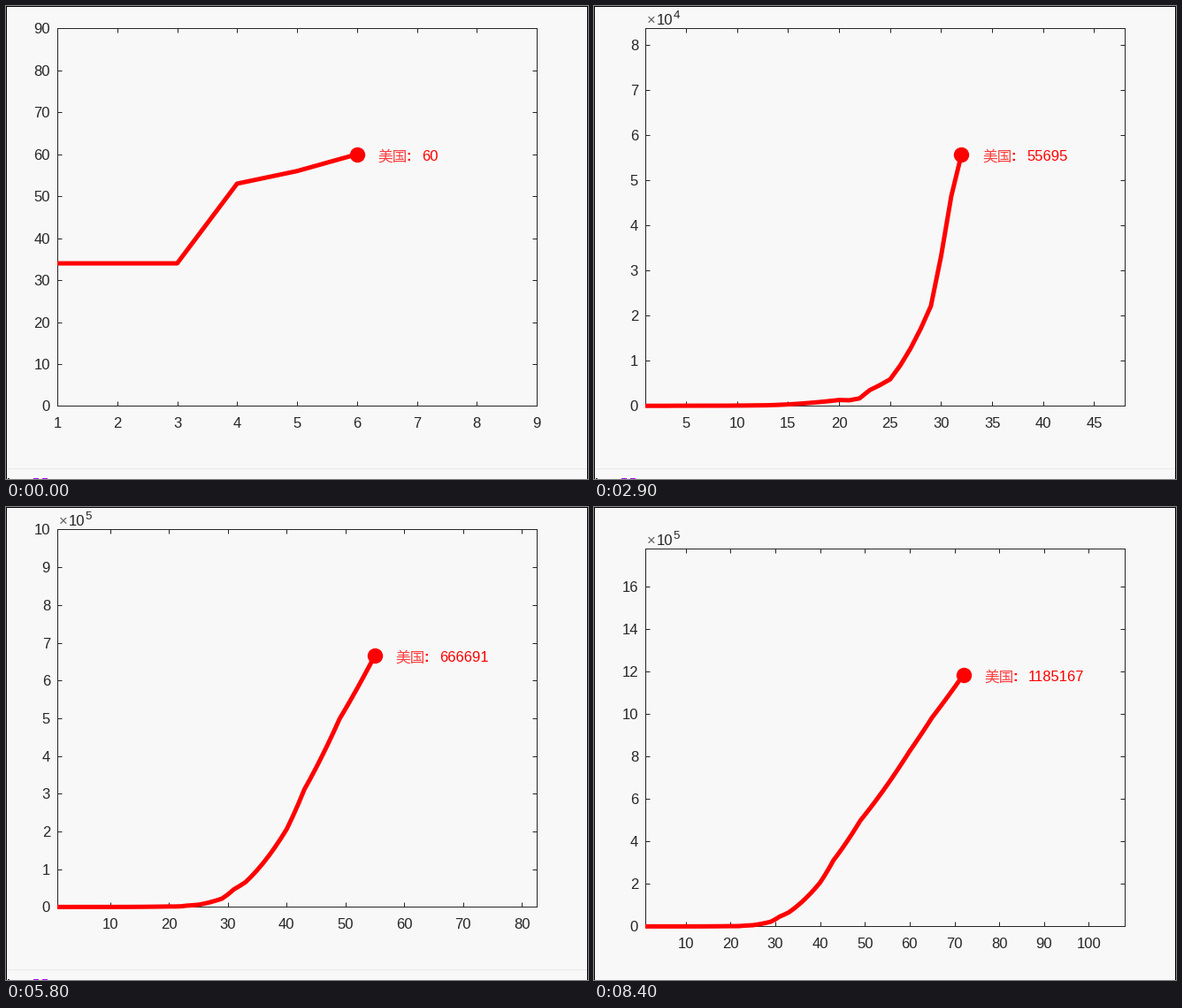
Animation, 658 px wide and 535 px high, one loop 8.5 s. Source, as a matplotlib script:

```python
import math

import numpy as np
import matplotlib.pyplot as plt
from matplotlib.animation import FuncAnimation
from matplotlib.patches import Rectangle

W, H, DPI = 658, 535, 100
PX = 72 / DPI
INK, RED, PAPER = "#262626", "#ff0000", "#f8f8f8"
SIZE = 12
FRAMES, FIRST_DAY, LAST_DAY = 85, 6, 72

# Turning points of the curve; between them the square root grows evenly
KEYS = {1: 34, 3: 34, 4: 53, 6: 60, 9: 69, 13: 161, 15: 345,
        20: 1322, 21: 1264, 22: 1678, 23: 3503, 25: 5894,
        29: 22132, 31: 46450, 33: 65778, 40: 206207, 43: 311357,
        49: 498674, 60: 825306, 65: 983457, 72: 1185167}
days = np.arange(1, LAST_DAY + 1)
cases = np.rint(np.interp(days, list(KEYS), np.sqrt(list(KEYS.values()))) ** 2)
cases = cases.astype(int)

# Each new day takes a little longer to arrive than the one before
step = np.arange(LAST_DAY - FIRST_DAY + 1)
arrival = step + np.floor(0.55 + step ** 2 / 273)

plt.rcParams["font.family"] = "Liberation Sans"
fig = plt.figure(figsize=(W / DPI, H / DPI), dpi=DPI, facecolor=PAPER)

stage = fig.add_axes([0, 0, 1, 1])
stage.set(xlim=(0, W), ylim=(H, 0))
stage.axis("off")


def block(x, y, w, h, color):
    return stage.add_patch(Rectangle((x, y), w, h, fc=color, lw=0))


block(0, 0, W, 1, "black")
block(0, 0, 1, H, "black")
block(W - 1, 0, 1, H, "black")
footer = [
    block(2, 533.6, 2, 1.4, "#333333"),
    block(31, 533.5, 6, 1.5, "#a800f0"),
    block(41, 533.5, 6, 1.5, "#a800f0"),
    stage.plot([1, W - 1], [522.5, 522.5], color="#dedede",
               lw=PX, ls=(0, (1, 1)))[0],
]

ax = fig.add_axes([0, 0, 1, 1], facecolor="none")
for spine in ax.spines.values():
    spine.set(linewidth=PX, color=INK)
ax.tick_params(direction="in", top=True, right=True, length=5 * PX,
               width=PX, color=INK, labelcolor=INK, labelsize=SIZE)
ax.tick_params(axis="x", pad=13 * PX)
ax.tick_params(axis="y", pad=8 * PX)

curve, = ax.plot([], [], color=RED, lw=5 * PX, zorder=3, clip_on=False,
                 solid_capstyle="butt", solid_joinstyle="round")
dot, = ax.plot([], [], "o", color=RED, ms=17.4 * PX, mew=0,
               zorder=4, clip_on=False)


def note(text, dx, dy, coords="data", **style):
    """Text whose baseline starts dx, dy pixels from its anchor."""
    style = {"fontsize": SIZE, "color": RED, **style}
    return ax.annotate(text, (0, 1), xytext=(dx * PX, dy * PX),
                       xycoords=coords, textcoords="offset points",
                       va="baseline", ha="left", annotation_clip=False,
                       **style)


label = [
    note("美国", 23.5, -8, family="Noto Sans CJK JP", alpha=0.75),
    note(":", 55.5, -7, weight="bold"),
    note("", 73.5, -7),
]
scale = [
    note("×", 1.5, 4.5, "axes fraction", color="#606060"),
    note("10", 12.5, 4.5, "axes fraction", color=INK),
    note("", 31.5, 11.5, "axes fraction", color=INK, fontsize=9.6),
]


def nice_step(span, most):
    """Smallest 1-2-5 step that cuts the span into at most `most` parts."""
    mag = 10 ** math.floor(math.log10(span))
    return next(s * mag for s in (0.1, 0.2, 0.5, 1) if span / (s * mag) <= most)


def y_step(top):
    mag = 10 ** math.floor(math.log10(top))
    # A range that barely passes 15 reads best in fives
    return mag / 2 if 1.5 <= top / mag < 1.52 else nice_step(top, 11)


def ticks(low, high, gap):
    return np.arange(math.ceil(low / gap), math.floor(high / gap + 1e-9) + 1) * gap


def update(i):
    last = i == FRAMES - 1
    day = FIRST_DAY + np.searchsorted(arrival, i, side="right") - 1
    value = cases[day - 1]
    right, top = 1.5 * day, 1.5 * value

    # The window slides down on the closing frame
    bottom = 452.4 + (22 if last else 0)
    ax.set_position([58 / W, 1 - bottom / H, 542 / W, 427 / H])
    for part in footer:
        part.set_visible(not last)

    power = math.floor(math.log10(top / 2))
    scaled = power >= 4
    unit = 10 ** power if scaled else 1
    xs = ticks(1, right, nice_step(right - 1, 12))
    ys = ticks(0, top, y_step(top))
    ax.set_xticks(xs, [f"{x:g}" for x in xs])
    ax.set_yticks(ys, [f"{y / unit:g}" for y in ys])
    ax.set(xlim=(1, right), ylim=(0, top))

    for part in scale:
        part.set_visible(scaled)
    scale[-1].set_text(str(power))

    curve.set_data(days[:day], cases[:day])
    dot.set_data([day], [value])
    for part in label:
        part.xy = (day, value)
    label[-1].set_text(str(value))
    return []


anim = FuncAnimation(fig, update, frames=FRAMES, init_func=lambda: update(0),
                     interval=100, repeat=True, blit=False)
plt.show()
```
